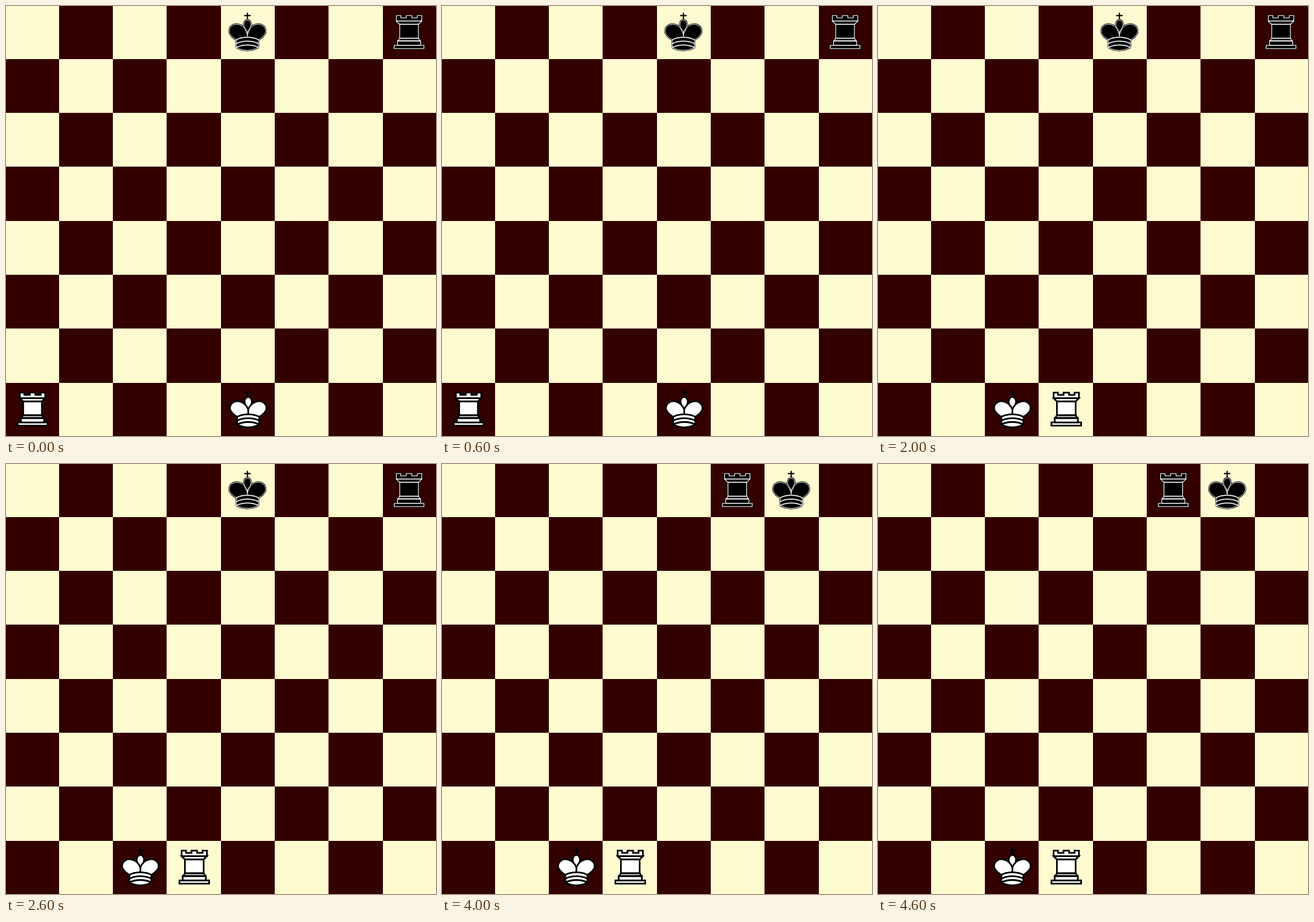
These frames come from a looping animation (664x664 px, 5000 ms). An HTML page with a canvas:

```html
<!DOCTYPE html>
<html lang="en">
<head>
<meta charset="utf-8">
<title>Castling</title>
<style>
html, body { margin: 0; width: 100%; height: 100%; overflow: hidden; background: #fffbd1; }
canvas { display: block; width: 664px; height: 664px; }
</style>
</head>
<body>
<canvas id="board" width="664" height="664"></canvas>
<script>
const ctx = document.getElementById('board').getContext('2d');
const SIZE = 664, STEP_MS = 1000;
const LIGHT = '#fffbd1', DARK = '#330000';

const edge = i => i === 0 ? 0 : i === 8 ? SIZE : Math.round(i * 83.3 - 1.4);

// Outlines on a 45-unit square
const paths = list => list.map(d => new Path2D(d));
const CROSS = new Path2D('M22.5 11.63V6M20 8h5');
const SHAPES = {
  king: paths([
    'M22.5 25s4.5-7.5 3-10.5c0 0-1-2.5-3-2.5s-3 2.5-3 2.5c-1.5 3 3 10.5 3 10.5',
    'M12.5 37c5.5 3.5 14.5 3.5 20 0v-7s9-4.5 6-10.5c-4-6.5-13.5-3.5-16 4V27v-3.5c-2.5-7.5-12-10.5-16-4-3 6 6 10.5 6 10.5z'
  ]),
  rook: paths([
    'M9 39h27v-3H9z',
    'M12 36v-4h21v4z',
    'M14 29.5l-1.5 2.5h20l-1.5-2.5z',
    'M14 17v12.5h17V17z',
    'M11 14l3 3h17l3-3z',
    'M11 14V9h4v2h5V9h5v2h5V9h4v5z'
  ])
};
const BANDS = new Path2D('M12.5 30c5.5-3 14.5-3 20 0M12.5 33.5c5.5-3 14.5-3 20 0M12.5 37c5.5-3 14.5-3 20 0');

function stroke(path, color, width) {
  ctx.strokeStyle = color;
  ctx.lineWidth = width;
  ctx.stroke(path);
}

function drawPiece(kind, white, col) {
  const scale = 1.7, king = kind === 'king';
  const cx = white ? 41 + 83.25 * col : 40 + 83.2 * col;
  const top = (white ? 581.7 : -0.5) + (king ? 1.6 : 0);
  ctx.save();
  ctx.translate(cx - 22.5 * scale, top);
  ctx.scale(scale, scale);
  ctx.lineCap = 'round';
  ctx.lineJoin = king ? 'round' : 'miter';
  if (king) stroke(CROSS, '#000', white ? 1.4 : 1.1);
  for (const p of SHAPES[kind]) {
    ctx.fillStyle = white ? '#fff' : '#000';
    ctx.fill(p);
    stroke(p, '#000', 1.5);
  }
  if (!white) for (const p of SHAPES[kind]) stroke(p, '#fff', king ? 0.55 : 0.65);
  if (king) stroke(BANDS, white ? '#000' : '#fff', white ? 1.5 : 0.9);
  ctx.restore();
}

function drawGlow(col, row) {
  const x = edge(col), y = edge(row);
  const w = edge(col + 1) - x, h = edge(row + 1) - y;
  const cx = x + w / 2, cy = y + h / 2;
  const g = ctx.createRadialGradient(cx, cy, 0, cx, cy, 58);
  g.addColorStop(0, 'rgba(255,255,255,.88)');
  g.addColorStop(0.2, 'rgba(250,255,253,.88)');
  g.addColorStop(1, 'rgba(156,255,224,.87)');
  ctx.fillStyle = g;
  ctx.fillRect(x, y, w, h);
  for (let i = 0; i < 4; i++) {
    ctx.strokeStyle = `rgba(70,150,130,${0.34 - i * 0.09})`;
    ctx.lineWidth = 1;
    ctx.strokeRect(x + i + 0.5, y + i + 0.5, w - 2 * i - 1, h - 2 * i - 1);
  }
}

const GLOWS = {
  1: [[3, 6], [4, 6], [5, 6], [2, 7], [3, 7], [5, 7]],
  3: [[5, 0], [6, 0], [4, 1], [5, 1]]
};

function draw(step) {
  for (let row = 0; row < 8; row++) {
    for (let col = 0; col < 8; col++) {
      const x = edge(col), y = edge(row);
      ctx.fillStyle = (row + col) % 2 ? DARK : LIGHT;
      ctx.fillRect(x, y, edge(col + 1) - x, edge(row + 1) - y);
    }
  }
  for (const [col, row] of GLOWS[step] || []) drawGlow(col, row);
  const whiteDone = step >= 2, blackDone = step >= 4;
  drawPiece('king', true, whiteDone ? 2 : 4);
  drawPiece('rook', true, whiteDone ? 3 : 0);
  drawPiece('king', false, blackDone ? 6 : 4);
  drawPiece('rook', false, blackDone ? 5 : 7);
}

const start = performance.now();
function tick() {
  draw(Math.floor((performance.now() - start) / STEP_MS) % 5);
  requestAnimationFrame(tick);
}
tick();
</script>
</body>
</html>
```
